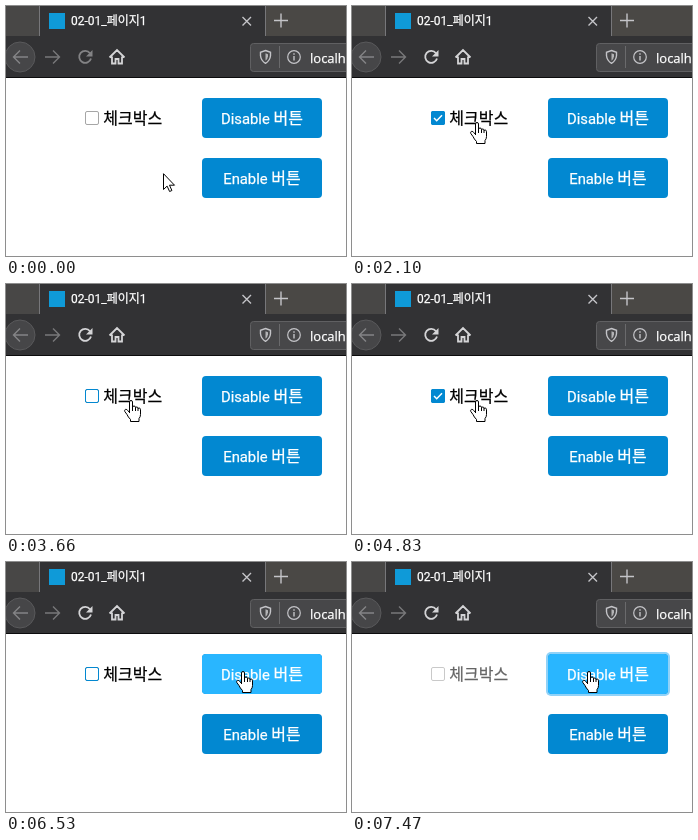
Write an HTML page that moves like this. It is 340 by 250 pixels and loops after 8 s.

```html
<!DOCTYPE html>
<html lang="ko">
<head>
<meta charset="utf-8">
<style>
html, body { margin: 0; width: 100%; height: 100%; overflow: hidden; background: #fff; }
svg { display: block; width: 340px; height: 250px; }
text { font-family: Roboto, "Noto Sans", sans-serif; white-space: pre; stroke-width: .25; }
.ko { font-family: "Noto Sans CJK KR", "Noto Sans CJK", sans-serif; }
.chrome { fill: #fff; stroke: #fff; }
.line { fill: none; stroke: #d4d4d6; stroke-width: 1.8; }
.thin { fill: none; stroke: #c4c4c8; stroke-width: 1.4; }
.button { font-size: 14.8px; fill: #fff; stroke: #fff; text-anchor: middle; }
.button .ko, #label { font-size: 16px; }
#label { stroke: #000; }
</style>
</head>
<body>
<svg viewBox="0 0 340 250">
  <!-- browser tabs -->
  <rect width="340" height="72" fill="#323234"/>
  <rect width="33" height="30" fill="#484746"/>
  <rect x="259" width="81" height="30" fill="#4a4845"/>
  <path stroke="#77777a" d="M33.500 0v30M259.500 0v30"/>
  <rect x="43" y="7" width="16" height="16" fill="#0f9ad8"/>
  <text class="chrome" x="65" y="19" font-size="12">02-01_<tspan class="ko">페이지</tspan>1</text>
  <path class="thin" d="M236.500 11l8.500 8.500m0-8.500l-8.500 8.500"/>
  <path class="thin" d="M268 14.500h14m-7-7v14"/>

  <!-- toolbar -->
  <circle cx="14" cy="51" r="15" fill="#464648" stroke="#59595b"/>
  <path class="thin" style="stroke:#848486" d="M22 51H7.500m6.500-6.500L7.500 51l6.500 6.500"/>
  <path class="thin" style="stroke:#78787a" d="M39 51h14.500m-6.500-6.500l6.500 6.500-6.500 6.500"/>
  <g id="reload">
    <path class="line" d="M84 47.200A6 6 0 1 0 85 52.500"/>
    <path fill="#d4d4d6" d="M86.500 44v6.500H80z"/>
  </g>
  <path class="line" d="M103.500 51.500L111 44l7.500 7.500M106 50.500V57.500h3.500V53h3v4.500H116V50.500"/>
  <path fill="#474749" stroke="#606062" d="M341 37.500H247.500q-3 0-3 3v22q0 3 3 3H341z"/>
  <path class="thin" d="M259.500 44.500l5 1.800v3.500q-.5 5-5 7.500-4.500-2.500-5-7.500v-3.500z"/>
  <path fill="#b4b4b6" d="M259.500 47.200l2.500 1v2q-.3 3-2.500 4.500z"/>
  <path stroke="#6a6a6c" d="M273.500 40v22"/>
  <circle class="thin" style="stroke-width:1.2" cx="288" cy="51" r="6.300"/>
  <path class="thin" d="M288 47.300v1.500m0 1.200v4.500"/>
  <text class="chrome" x="304" y="56.500" style="font:13px 'Open Sans',sans-serif">localhost</text>
  <rect y="71" width="340" height="1" fill="#0c0c0d"/>
  <rect y="72" width="340" height="178" fill="#fff"/>

  <!-- page -->
  <g id="field">
    <g fill="none">
      <rect x="79.500" y="105.500" width="13" height="13" rx="1.500" stroke="#a6a6a6"/>
      <rect id="blueEdge" x="79.500" y="105.500" width="13" height="13" rx="1.500" stroke="#0288d1"/>
    </g>
    <g id="mark">
      <rect x="79" y="105" width="14" height="14" rx="2" fill="#0288d1"/>
      <path fill="none" stroke="#fff" stroke-width="1.500" d="M82 112l2.700 2.700 5.300-5.400"/>
    </g>
    <text id="label" class="ko" x="97.300" y="117.500">체크박스</text>
  </g>
  <rect id="ring" x="194" y="90" width="124" height="44" rx="5" fill="#90d2f8"/>
  <rect x="196" y="92" width="120" height="40" rx="4" fill="#0288d1"/>
  <rect id="hover" x="196" y="92" width="120" height="40" rx="4" fill="#29b6ff"/>
  <text class="button" x="256" y="118">Disable <tspan class="ko">버튼</tspan></text>
  <rect x="196" y="152" width="120" height="40" rx="4" fill="#0288d1"/>
  <text class="button" x="256" y="178">Enable <tspan class="ko">버튼</tspan></text>

  <!-- pointer -->
  <g id="pointer" fill="#fff" stroke="#000" stroke-linejoin="round">
    <path id="arrow" d="M.5.7V16.500l3.600-3.400 2.500 5.400 2.300-1-2.400-5.300h5z"/>
    <path id="hand" transform="translate(-6)" d="M5.500 13V2Q5.500.5 7 .5T8.500 2V7.500Q8.500 6 10 6T11.500 7.500V8Q11.500 7 12.800 7T14 8.500V9Q14 8 15.200 8T16.500 9.800V14.500Q16.500 17 15 18.500V21.500H6.500V19.500Q4 17 3 14.500L.8 11.500Q.2 10 1.500 9.300 3 9 4 10.800L5.500 12.500M8.500 7V11M11.500 8V11M14 9V11"/>
    <circle id="press" cx="2" r="12" fill="#ff0" fill-opacity=".47" stroke="none"/>
  </g>
</svg>
<script>
const LOOP = 8000;
const part = id => document.getElementById(id);
const fade = (id, value) => part(id).setAttribute('opacity', value);
const mix = (a, b, p) => a + (b - a) * p;

// Progress in equal jumps: the first at `from`, the last at `to`.
function jumps(t, from, to, count) {
  if (t < from) return 0;
  const gap = (to - from) / (count - 1);
  return Math.min(count, Math.floor((t - from) / gap + 1e-6) + 1) / count;
}

const path = [
  { from: 700, to: 1090, count: 6, x: 124, y: 116 },
  { from: 6230, to: 6530, count: 5, x: 236, y: 109 }
];

const toggles = [
  { press: 1790, from: 1868, to: 2100, count: 4, on: 1 },
  { press: 3190, from: 3340, to: 3660, count: 5, on: 0 },
  { press: 4440, from: 4590, to: 4830, count: 4, on: 1 },
  { press: 5520, from: 5690, to: 5920, count: 4, on: 0 }
];
const disable = { press: 7240, from: 7317, to: 7470, count: 3 };
const progress = (t, s) => jumps(t, s.from, s.to, s.count);

function render(t) {
  let x = 157, y = 167;
  for (const move of path) {
    const p = progress(t, move);
    x = mix(x, move.x, p);
    y = mix(y, move.y, p);
  }
  x = Math.round(x);
  y = Math.round(y);
  const overLabel = x < 157 && y < 124;
  const overButton = x >= 196 && y < 132;
  const hand = overLabel || overButton;
  part('pointer').setAttribute('transform', `translate(${x} ${y})`);
  fade('arrow', hand ? 0 : 1);
  fade('hand', hand ? 1 : 0);
  fade('press', [...toggles, disable].some(c => t >= c.press && t < c.from) ? 1 : 0);

  const checked = toggles.reduce((v, s) => mix(v, s.on, progress(t, s)), 0);
  const off = progress(t, disable);
  fade('mark', checked);
  fade('blueEdge', progress(t, toggles[0]) * (1 - off));
  fade('field', off ? 0.6 : 1);
  fade('ring', off);
  fade('hover', overButton ? jumps(t, 6455, 6530, 2) : 0);
  fade('reload', t < 70 ? 0.5 : 1);
}

const start = performance.now();
function tick() {
  render((performance.now() - start) % LOOP);
  requestAnimationFrame(tick);
}
render(0);
requestAnimationFrame(tick);
</script>
</body>
</html>
```
